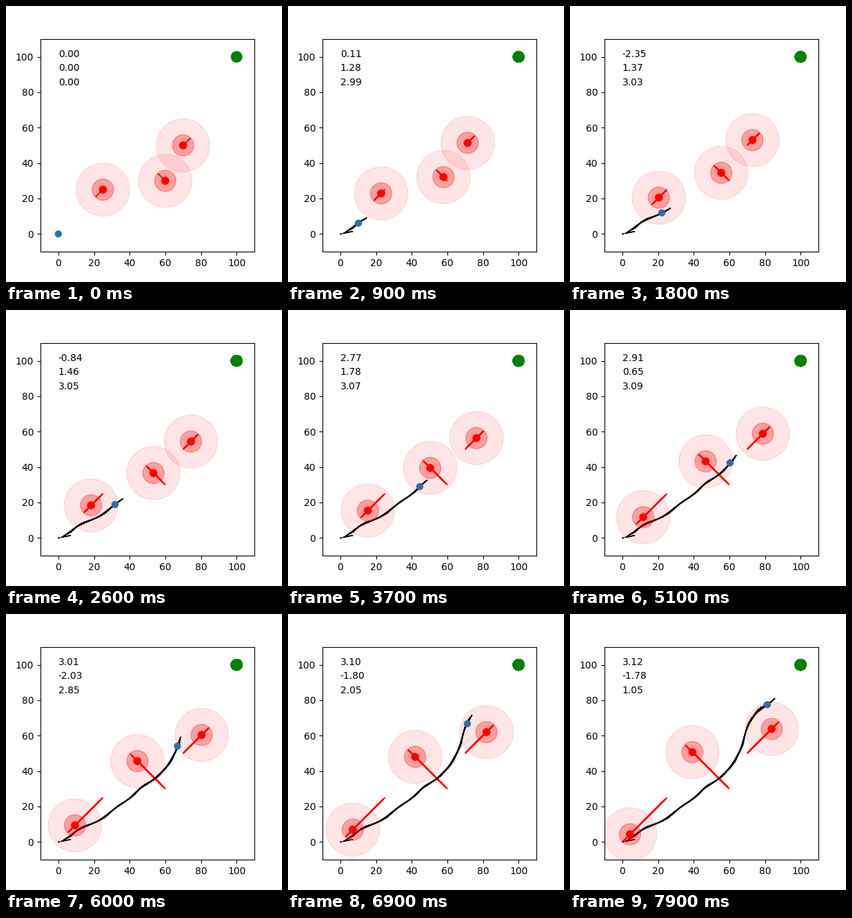
Write a matplotlib script that moves like this. It is 400 px wide and 400 px high and loops after 8 s.

```python
import numpy as np
import matplotlib.pyplot as plt
from matplotlib.animation import FuncAnimation
from matplotlib.patches import Circle

FRAMES = 80
STATES = FRAMES - 1  # the first state is held for two frames
ARROW = 5

# Key points of the robot's route, travelled at constant speed
ROUTE = np.array([
    (0, 0), (1.46, 0.3), (2.75, 1), (10, 6), (23.3, 12.6), (31.6, 18.75),
    (39.5, 24.4), (44.6, 29), (54.2, 36), (60.3, 42.2), (65, 49.8),
    (71.2, 66.6), (74.2, 71.4), (81.3, 77.5),
])

# Obstacles: start, heading, speed
OBSTACLES = [
    ((25, 25), -3 * np.pi / 4, 0.375),
    ((60, 30), 3 * np.pi / 4, 0.375),
    ((70, 50), np.pi / 4, 0.25),
]


def smooth_path(points, count):
    """Cubic curve through the points, sampled evenly along its length."""
    chords = np.hypot(*np.diff(points, axis=0).T)
    knots = np.append(0, np.cumsum(chords))
    slopes = np.gradient(points, knots, axis=0)
    t = np.linspace(0, knots[-1], count)
    i = np.clip(np.searchsorted(knots, t, side="right") - 1, 0, len(chords) - 1)
    h = chords[i, None]
    u = (t - knots[i])[:, None] / h
    return ((1 + 2 * u) * (1 - u) ** 2 * points[i]
            + u * (1 - u) ** 2 * h * slopes[i]
            + u * u * (3 - 2 * u) * points[i + 1]
            + u * u * (u - 1) * h * slopes[i + 1])


path = smooth_path(ROUTE, STATES)


def unit(angle):
    return np.array([np.cos(angle), np.sin(angle)])


def obstacle_at(obstacle, step):
    start, heading, speed = obstacle
    return np.array(start) + speed * step * unit(heading)


def bearing(obstacle, step):
    """Angle of the robot as seen from the obstacle's heading."""
    dx, dy = path[step] - obstacle_at(obstacle, step)
    angle = np.arctan(dy / dx)
    if dy < 0:
        angle -= np.pi
    elif dx < 0:
        angle += np.pi
    angle -= obstacle[1]
    return (angle + np.pi) % (2 * np.pi) - np.pi


fig, ax = plt.subplots(figsize=(4, 4), dpi=100)
ax.set_xlim(-10, 110)
ax.set_ylim(-10, 110)


def disc(pos, radius, **style):
    return ax.add_patch(Circle(pos, radius, **style))


def arrow(pos, vec, color):
    return ax.arrow(*pos, *vec, width=0.15, color=color)


# Marks left behind at every step; the goal is painted again each time
marks = []
for k in range(STATES):
    group = [arrow(obstacle_at(o, k), ARROW * unit(o[1]), "r")
             for o in OBSTACLES]
    if k:
        move = path[k] - path[k - 1]
        vec = ARROW * move / np.hypot(*move)
    else:
        vec = (0.2, 0)  # still at rest
    group.append(arrow(path[k], vec, "k"))
    group.append(disc((100, 100), 3, color="g"))
    marks.append(group)

robot = disc(path[0], 2)
rings = [[disc(o[0], radius, color="r", alpha=alpha)
          for radius, alpha in ((15, 0.1), (6, 0.3), (2, 1))]
         for o in OBSTACLES]
labels = [ax.text(0, y, "") for y in (100, 92, 84)]


def draw(frame):
    step = max(frame - 1, 0)
    robot.center = path[step]
    for k, group in enumerate(marks):
        for mark in group:
            mark.set_visible(k <= step)

    for obstacle, discs, label in zip(OBSTACLES, rings, labels):
        for d in discs:
            d.center = obstacle_at(obstacle, step)
        # readouts lag one step behind
        value = bearing(obstacle, max(frame - 2, 0)) if frame else 0.0
        label.set_text(f"{round(value, 2) + 0.0:.2f}")
    return []


anim = FuncAnimation(fig, draw, frames=FRAMES, interval=100,
                     repeat=True, repeat_delay=0)
plt.show()
```
